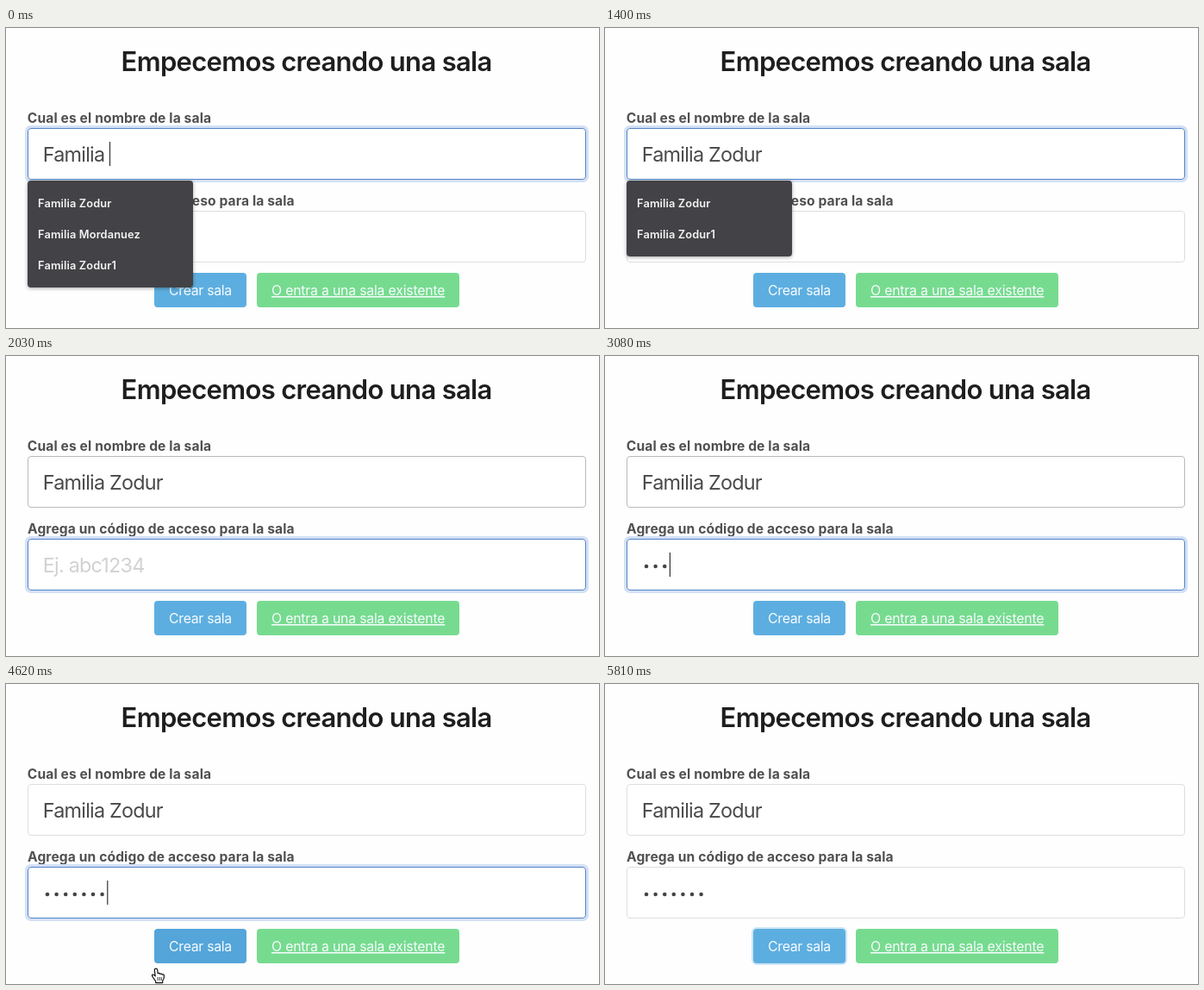
Recreate the animation shown at these times as an HTML page. Size 688 px wide and 348 px high, loop 5950 ms.

```html
<!DOCTYPE html>
<html lang="es">
<head>
<meta charset="utf-8">
<title>Crear sala</title>
<style>
  html, body { margin: 0; width: 100%; height: 100%; overflow: hidden; background: #fefefe; }
  svg { display: block; width: 688px; height: 348px; }
  text { font-family: Inter, "Open Sans", sans-serif; white-space: pre; }
  .title { font-size: 31px; font-weight: 600; fill: #1e1e1e; letter-spacing: -.022em; }
  .label { font-size: 15.6px; font-weight: 700; fill: #505050; letter-spacing: .007em; }
  .value { font-size: 23.4px; fill: #4a4a4a; letter-spacing: -.034em; }
  .hint { fill: #d2d2d2; }
  .btn { font-size: 15.8px; fill: #f6fbfd; letter-spacing: -.018em; }
  .link { letter-spacing: -.012em; text-decoration: underline; text-decoration-thickness: 1px; }
  .item { font-size: 12.8px; font-weight: 600; fill: #f4f4f4; letter-spacing: .01em; }
  .box { fill: #fff; stroke: #dedede; }
  .box.hover { stroke: #b9b9b9; }
  .box.focus { stroke: #5484c6; }
  .glow { fill: none; stroke: #d3e1f5; stroke-width: 3; }
  .caret { fill: #333; }
  #menu { filter: drop-shadow(0 1px 2px rgba(0, 0, 0, .35)); }
</style>
</head>
<body>
<svg viewBox="0 0 688 348">
  <text class="title" x="133.6" y="50">Empecemos creando una sala</text>

  <text class="label" x="24.8" y="110">Cual es el nombre de la sala</text>
  <rect class="glow" id="glow1" x="23.5" y="114.5" width="651" height="63" rx="5"/>
  <rect class="box" id="box1" x="25.5" y="116.5" width="647" height="59" rx="3.5"/>
  <text class="value" id="name" x="42.8" y="155"></text>

  <text class="label" x="25" y="206">Agrega un código de acceso para la sala</text>
  <rect class="glow" id="glow2" x="23.5" y="210.5" width="651" height="63" rx="5"/>
  <rect class="box" id="box2" x="25.5" y="212.5" width="647" height="59" rx="3.5"/>
  <text class="value hint" id="hint" x="42.8" y="251">Ej. abc1234</text>
  <g id="dots" fill="#444"></g>
  <rect class="caret" id="caret" width="1.2" height="28"/>

  <rect id="halo" x="171" y="283" width="109" height="42" rx="5" fill="none" stroke="#cfe6f6" stroke-width="2"/>
  <rect id="create" x="172" y="284" width="107" height="40" rx="4"/>
  <text class="btn" x="189" y="310">Crear sala</text>
  <rect x="291" y="284" width="235" height="40" rx="4" fill="#76db8f"/>
  <text class="btn link" x="308" y="310">O entra a una sala existente</text>

  <g id="menu">
    <rect id="panel" x="25" y="177" width="192" rx="4" fill="#434246"/>
    <text class="item" x="37" y="208">Familia Zodur</text>
    <text class="item" id="item2" x="37" y="244"></text>
    <text class="item" id="item3" x="37" y="280">Familia Zodur1</text>
  </g>

  <circle id="ring" cx="185.4" cy="292.4" r="29" fill="none" stroke="#111" stroke-width="2.9"/>
  <g id="hand" fill="#fff" stroke="#111" stroke-width="1.2" stroke-linejoin="round" stroke-linecap="round">
    <path d="M-1.7 1.6Q-1.6 0 0 0Q1.5 0 1.7 1.6L2.2 5.6Q3.8 4.6 4.7 6.2Q6.3 5.2 7.2 6.9Q9.3 6.2 9.4 8.3L9.2 11Q8.6 13 7.7 14V16.4H-.3V14.6Q-2 12.5-3.8 9.6Q-5.2 7.4-3.8 6.9Q-2.4 6.5-.8 8.8Z"/>
    <path d="M2 10.2V13.4M4.2 10.2V13.4M6.3 10.2V13.4" stroke-width=".8"/>
  </g>
</svg>
<script>
const LOOP = 5950, STEP = 70;
const NAME = 'Familia Zodur', PREFIX = 8;
const NAME_KEYS = [140, 350, 490, 630, 840];
const CODE_KEYS = [2310, 2590, 3080, 3570, 3850, 4060, 4270];
const DOT_GAP = 10.6;

const $ = id => document.getElementById(id);
const show = (id, on) => $(id).setAttribute('visibility', on ? 'visible' : 'hidden');
const set = (id, attrs) => { for (const k in attrs) $(id).setAttribute(k, attrs[k]); };
const between = (t, a, b) => t >= a && t < b;
const typed = (keys, t) => keys.filter(k => k <= t).length;
const mix = (a, b, p) => a + (b - a) * p;

const dots = CODE_KEYS.map((_, i) => {
  const dot = document.createElementNS('http://www.w3.org/2000/svg', 'circle');
  dot.setAttribute('cx', 48 + i * DOT_GAP);
  dot.setAttribute('cy', 244);
  dot.setAttribute('r', 2.3);
  return $('dots').appendChild(dot);
});

function field(n, focus, hover) {
  $('box' + n).setAttribute('class', 'box' + (focus ? ' focus' : hover ? ' hover' : ''));
  show('glow' + n, focus);
}

function pointer(t) {
  if (t < 5600) {
    const p = Math.max(0, Math.min(1, (t - 4480) / 560));
    const e = 1 - Math.pow(1 - p, 1.3);
    return [mix(169, 185, e), mix(347.5, 292, e)];
  }
  const p = (t - 5530) / 210;
  return [mix(185, 304, p * p), mix(292, 338, p * p)];
}

function draw(t) {
  const onName = t < 1470, onCode = between(t, 1470, 5110);
  field(1, onName, between(t, 1470, 4480));
  field(2, onCode, false);

  $('name').textContent = NAME.slice(0, PREFIX + typed(NAME_KEYS, t));
  const count = typed(CODE_KEYS, t);
  dots.forEach((d, i) => d.setAttribute('visibility', i < count ? 'visible' : 'hidden'));
  show('hint', onCode && !count);

  show('caret', t < 1400 || (onCode && !between(t, 2030, 2310)));
  set('caret', onName
    ? { x: 42.7 + $('name').getComputedTextLength(), y: 132 }
    : { x: 43 + count * DOT_GAP, y: 228 });

  const all = t < 210;
  show('menu', onName);
  set('panel', { height: all ? 124 : 88 });
  $('item2').textContent = all ? 'Familia Mordanuez' : 'Familia Zodur1';
  show('item3', onName && all);

  set('create', { fill: between(t, 4550, 5670) ? '#54a5da' : '#5daee0' });
  show('halo', t >= 5180);
  show('ring', between(t, 5110, 5390));
  set('ring', { opacity: Math.min(1, (5390 - t) / 210) });

  const [x, y] = pointer(t);
  show('hand', between(t, 4480, 5810));
  set('hand', { transform: `translate(${x} ${y})` });
}

const start = performance.now();
function tick() {
  const t = (performance.now() - start) % LOOP;
  draw(Math.floor(t / STEP) * STEP);
  requestAnimationFrame(tick);
}
tick();
</script>
</body>
</html>
```
